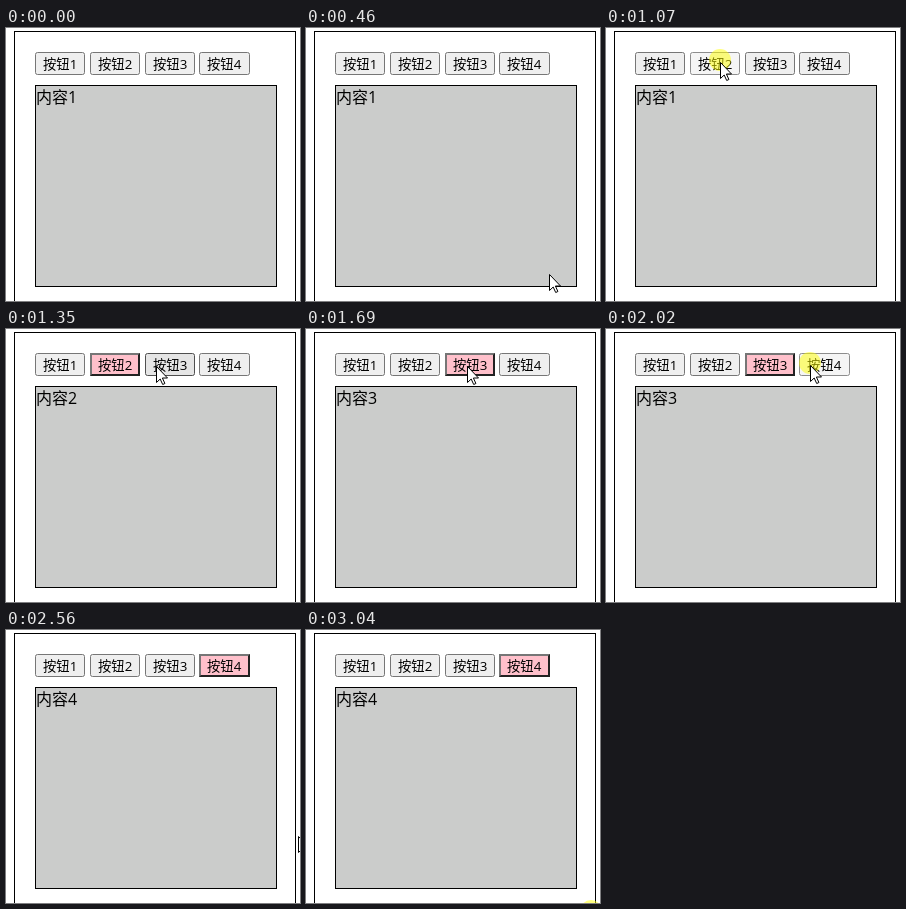
Recreate the animation shown at these times as an HTML page. Size 294x273 px, loop 3120 ms.

```html
<!DOCTYPE html>
<html lang="zh-CN">
<head>
<meta charset="utf-8">
<title>按钮切换</title>
<style>
  html, body { margin: 0; width: 100%; height: 100%; overflow: hidden; background: #fff; }
  svg { display: block; }
  text { font: 13.333px "Open Sans", "Noto Sans", "Noto Sans CJK SC", "Noto Sans CJK", sans-serif; }
  #content { font-size: 16px; }
  .frame { fill: none; stroke: #000; }
  .face { fill: #efefef; stroke: #767676; }
  .hover .face { fill: #e5e5e5; stroke: #4f4f4f; }
  .pressed .face { fill: #f5f5f5; stroke: #8d8d8d; }
  .bevel { display: none; }
  .active .face { display: none; }
  .active .bevel { display: inline; }
</style>
</head>
<body>
<svg width="294" height="273" viewBox="0 0 294 273">
  <rect class="frame" x="8.5" y="3.5" width="281" height="300"/>
  <rect class="frame" x="29.5" y="57.5" width="241" height="201" style="fill:#cbcccb"/>
  <text id="content" x="30" y="75"></text>
  <g id="buttons"></g>
  <circle id="halo" r="11" fill="#ff0" fill-opacity=".5"/>
  <path id="cursor" d="M.5 .5V16.5L4.2 13 6.7 18.5 8.9 17.5 6.4 12H11.5Z" fill="#fff" stroke="#000"/>
</svg>
<script>
const LOOP = 3120, TICK = 67.5, TOP = 24, HEIGHT = 23;
const $ = id => document.getElementById(id);

// Key points of the pointer's path: time, x, y.
const path = [
  [470, 244, 248], [740, 149, 38], [940, 114, 34],
  [1090, 114, 34], [1350, 150, 37], [1490, 161, 37],
  [1690, 161, 37], [1950, 204, 36],
  [2160, 204, 36], [2280, 190, 28], [2560, 292, 204], [2700, 293, 252], [2840, 285, 283]
];

// Each click lasts one tick; button 0 is outside the page.
const clicks = [
  { down: 1020, button: 2 }, { down: 1620, button: 3 },
  { down: 2020, button: 4 }, { down: 3040, button: 0 }
];

const buttons = [1, 2, 3, 4].map((n, i) => {
  const left = Math.round(29 + i * 54.75);
  const right = Math.round(79.4 + i * 54.75);
  return { n, left, right, width: right - left };
});

$('buttons').innerHTML = buttons.map(({ n, left, width }) => `
  <g id="b${n}" transform="translate(${left} ${TOP})">
    <rect class="face" x=".5" y=".5" width="${width - 1}" height="${HEIGHT - 1}" rx="2"/>
    <g class="bevel">
      <rect width="${width}" height="${HEIGHT}" fill="#222"/>
      <path d="M0 ${HEIGHT}V0H${width}l-2 2L2 ${HEIGHT - 2}Z" fill="#767676"/>
      <rect x="2" y="2" width="${width - 4}" height="${HEIGHT - 4}" fill="pink"/>
    </g>
    <text x="8" y="17">按钮${n}</text>
  </g>`).join('');

function pointerAt(t) {
  if (t < path[0][0]) return [-50, -50];
  const next = path.findIndex(p => p[0] > t);
  if (next < 0) return path.at(-1).slice(1);
  const [t0, x0, y0] = path[next - 1];
  const [t1, x1, y1] = path[next];
  const k = (t - t0) / (t1 - t0);
  return [x0 + (x1 - x0) * k, y0 + (y1 - y0) * k].map(Math.round);
}

function draw(t) {
  const tick = Math.floor((t + 13) / TICK) * TICK;
  const [x, y] = pointerAt(tick);
  const [hoverX, hoverY] = pointerAt(tick - TICK); // hover lags one tick
  const last = clicks.findLast(c => t >= c.down);
  const pressed = last && t < last.down + 70 ? last : null;
  const active = clicks.findLast(c => c.button && t >= c.down + 60 && c !== pressed)?.button;

  for (const { n, left, right } of buttons) {
    const over = hoverX >= left && hoverX < right && hoverY >= TOP && hoverY < TOP + HEIGHT;
    const state = n === active ? 'active' : n === pressed?.button ? 'pressed' : over ? 'hover' : '';
    $('b' + n).setAttribute('class', state);
  }
  $('content').textContent = '内容' + (active || 1);
  $('cursor').setAttribute('transform', `translate(${x} ${y})`);
  $('halo').setAttribute('transform', `translate(${x} ${y - 2})`);
  $('halo').style.display = pressed ? '' : 'none';
}

(function animate() {
  draw(performance.now() % LOOP);
  requestAnimationFrame(animate);
})();
</script>
</body>
</html>
```
